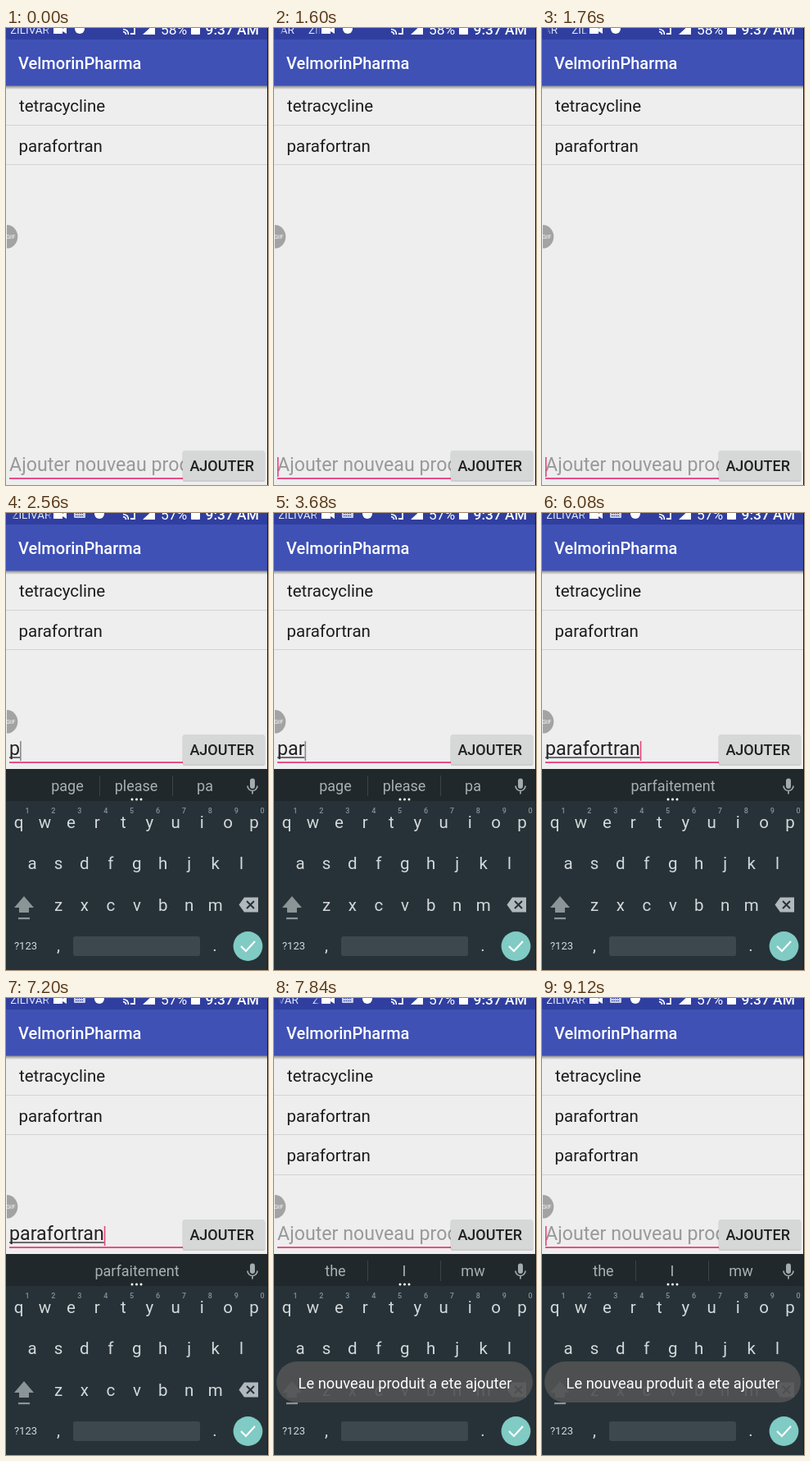
Recreate the animation shown at these times as an HTML page. Size 320x557 px, loop 9.28 s.

```html
<!DOCTYPE html>
<html lang="fr">
<head>
<meta charset="utf-8">
<title>Ajouter un produit</title>
<style>
  html, body { margin: 0; width: 100%; height: 100%; overflow: hidden; background: #eee; }
  svg { display: block; width: 100%; height: 100%; font-family: Roboto, sans-serif; }
  text { white-space: pre; }
  .mid { text-anchor: middle; }
  .medium { font-weight: 500; }
  .status { fill: #fff; font-size: 17.4px; }
  .item { font-size: 20.5px; fill: #1c1c1e; }
  .field { font-size: 23.2px; }
  .word { font-size: 18px; fill: #a9b1b4; }
  .key { font-size: 20.5px; fill: #d3d8da; }
  .digit { font-size: 9px; font-weight: 500; fill: #87919a; }
</style>
</head>
<body>
<svg viewBox="0 0 320 557" preserveAspectRatio="none">
  <defs>
    <linearGradient id="shade" x2="0" y2="1">
      <stop stop-color="#000" stop-opacity=".45"/>
      <stop offset="1" stop-color="#000" stop-opacity="0"/>
    </linearGradient>
    <linearGradient id="fade">
      <stop id="fadeStart" stop-color="#fff"/>
      <stop offset=".14" stop-color="#fff"/>
      <stop offset=".84" stop-color="#fff"/>
      <stop offset="1" stop-color="#000"/>
    </linearGradient>
    <mask id="carrierMask"><rect x="6" width="51" height="14" fill="url(#fade)"/></mask>
    <clipPath id="fieldClip"><rect y="-40" width="216" height="60"/></clipPath>
  </defs>

  <rect width="320" height="557" fill="#eee"/>

  <g id="list">
    <text class="item" x="16" y="102">tetracycline</text>
    <text class="item" x="15.5" y="151">parafortran</text>
    <path d="M0 118.5H319M0 166.5H319" stroke="#d3d3d3"/>
    <g id="added">
      <text class="item" x="15.5" y="199">parafortran</text>
      <path d="M0 215.5H319" stroke="#d3d3d3"/>
    </g>
  </g>

  <rect y="70" width="320" height="5" fill="url(#shade)"/>
  <rect width="320" height="70.4" fill="#3f51b5"/>
  <rect width="320" height="14" fill="#303f9f"/>
  <text class="medium" x="15" y="50" font-size="20" fill="#fff">VelmorinPharma</text>

  <g class="status">
    <g mask="url(#carrierMask)">
      <g id="carrier" font-size="13.5" fill="#e4e7f5">
        <text x="5" y="7">ZILIVAR</text><text x="70" y="7">ZILIVAR</text>
      </g>
    </g>
    <path d="M58 -2H69V1L74 -2V7L69 4V7H58Z"/>
    <g id="keyIcon">
      <rect x="83" y="-3" width="14" height="9" rx="1" fill="#c8cdea"/>
      <path d="M85 .5H95M85 3.5H95" stroke="#303f9f" stroke-dasharray="1.5 1"/>
    </g>
    <circle id="store" cy="1" r="6"/>
    <path d="M144 -2H157V7H152" fill="none" stroke="#fff" stroke-width="1.8"/>
    <path d="M143 1.5Q149.5 2 149.5 8M143 4.5Q146.5 5 146.5 8" fill="none" stroke="#fff" stroke-width="1.7"/>
    <path d="M167 8L182 -6V8Z"/>
    <text id="charge" x="189" y="8"></text>
    <rect x="226" y="-5" width="11" height="13" rx="1"/>
    <text class="medium" x="243.5" y="8">9:37 AM</text>
  </g>

  <path d="M1 240A13.3 14.3 0 0 1 1 268.6Z" fill="#a3a3a3"/>
  <text x="0" y="257" font-size="7.5" fill="#fff">GIF</text>

  <g id="entry">
    <g clip-path="url(#fieldClip)">
      <text id="hint" class="field" x="4" fill="#999">Ajouter nouveau produit</text>
      <text id="typed" class="field" x="4" fill="#222"></text>
      <rect id="composing" x="4" y="2.3" height="1.4" fill="#333"/>
    </g>
    <rect x="4" y="8" width="213" height="2" fill="#ea4e88"/>
    <rect id="caret" y="-17" width="1.6" height="24"/>
    <rect x="215.5" y="-24" width="101" height="37" rx="2.5" fill="#000" opacity=".14"/>
    <rect x="216" y="-25" width="100" height="36" rx="2" fill="#d6d7d7"/>
    <text class="medium" x="224.4" y="0" font-size="18" fill="#202020">AJOUTER</text>
  </g>

  <rect x="319" width="1" height="557" fill="#1a1a1a"/>

  <g id="keyboard">
    <rect y="312" width="319" height="245" fill="#263238"/>
    <rect y="312" width="319" height="39" fill="#20282b"/>
    <path id="dividers" d="M114.5 320V345M203.5 320V345" stroke="#3a4549"/>
    <g id="words"></g>
    <g fill="#fff"><circle cx="154" cy="349" r="1.5"/><circle cx="159.5" cy="349" r="1.5"/><circle cx="165" cy="349" r="1.5"/></g>
    <g fill="none" stroke="#a3abae" stroke-width="1.7">
      <path d="M301 326.5V333" stroke-width="6" stroke-linecap="round"/>
      <path d="M295 332.5A6 6 0 0 0 307 332.5M301 338.5V342.5"/>
    </g>
    <g id="keys"></g>
    <path d="M22 467L34 481H28V487H16V481H10Z" fill="#8b9598"/>
    <rect x="15" y="493" width="14" height="2.2" fill="#8b9598"/>
    <path d="M284.5 477.5L291 468.5H308V486.5H291Z" fill="#b1b9bc"/>
    <path d="M294 473L303 482M303 473L294 482" stroke="#263238" stroke-width="2"/>
    <rect x="82" y="516" width="155" height="24" rx="3" fill="#3c484e"/>
    <circle cx="295.5" cy="528" r="17.9" fill="#80cbc4"/>
    <path d="M287 528L293 534L304 522" fill="none" stroke="#fff" stroke-width="2.2"/>
  </g>

  <g id="toast">
    <rect x="3" y="443" width="313" height="50" rx="25" fill="#525354" fill-opacity=".9"/>
    <text class="mid" x="160" y="476" font-size="18.3" fill="#fff">Le nouveau produit a ete ajouter</text>
  </g>
</svg>

<script>
const LOOP = 9280, STEP = 160;
const OPEN = 1920, SUBMIT = 7360;
const PRODUCT = 'parafortran';
const strokes = [2400, 3200, 3680, 4000, 4160, 4320, 4480, 5120, 5440, 5600, 5880];
const caretResets = [320, 1760, ...strokes];
const marqueeStarts = [820, 3950, 7200];
const MARQUEE_SPEED = 0.036, MARQUEE_SPAN = 65;

const $ = id => document.getElementById(id);
const show = (id, on) => $(id).style.display = on ? '' : 'none';
const label = (cls, x, y, s, extra = '') =>
  `<text class="${cls} mid" x="${x}" y="${y}" ${extra}>${s}</text>`;

const row = (letters, x, y) =>
  [...letters].map((c, i) => label('key', x + i * 31.95, y, c)).join('');
$('keys').innerHTML =
  row('qwertyuiop', 15.5, 384) + row('asdfghjkl', 32, 434) + row('zxcvbnm', 64, 485) +
  [...'1234567890'].map((d, i) => label('digit', 26 + i * 31.9, 366, d)).join('') +
  label('key', 24, 532, '?123', 'style="font-size:13px"') +
  label('key', 64, 534, ',') + label('key', 255, 534, '.');

let shownWords = '';
function suggest(words) {
  if (words === shownWords) return;
  shownWords = words;
  const list = words.split(' ');
  const xs = list.length > 1 ? [75, 159, 243] : [160];
  $('words').innerHTML = list.map((w, i) => label('word', xs[i], 339, w)).join('');
  show('dividers', list.length > 1);
}

function marqueeShift(t) {
  const start = marqueeStarts.filter(s => s <= t).pop();
  if (start === undefined) return 0;
  const shift = (t - start) * MARQUEE_SPEED;
  return shift < MARQUEE_SPAN ? shift : 0;
}

function draw(t) {
  const open = t >= OPEN, submitted = t >= SUBMIT;
  const count = submitted ? 0 : strokes.filter(s => s <= t).length;

  const shift = marqueeShift(t);
  $('carrier').setAttribute('transform', `translate(${-shift} 0)`);
  $('fadeStart').setAttribute('stop-color', shift ? '#000' : '#fff');
  $('charge').textContent = open ? '57%' : '58%';
  $('store').setAttribute('cx', open ? 114 : 90);
  show('keyIcon', open);
  show('keyboard', open);
  show('added', submitted);

  $('entry').setAttribute('transform', `translate(0 ${open ? 295 : 540})`);
  show('hint', !count);
  $('typed').textContent = PRODUCT.slice(0, count);
  const width = count ? $('typed').getComputedTextLength() : 0;
  $('composing').setAttribute('width', width);

  const reset = caretResets.filter(s => s <= t).pop();
  show('caret', reset !== undefined && (t - reset) % 1000 < 500);
  $('caret').setAttribute('x', 4 + width);
  $('caret').setAttribute('fill', count && count < PRODUCT.length ? '#8a8a8a' : '#e84580');

  suggest(!count ? 'the I mw' : count < 4 ? 'page please pa' : 'parfaitement');
  $('toast').setAttribute('opacity', Math.max(0, Math.min(1, (t - SUBMIT) / 480)));
}

const origin = performance.now();
function tick() {
  const t = Math.max(0, performance.now() - origin) % LOOP;
  draw(Math.floor(t / STEP) * STEP);
  requestAnimationFrame(tick);
}
tick();
</script>
</body>
</html>
```
